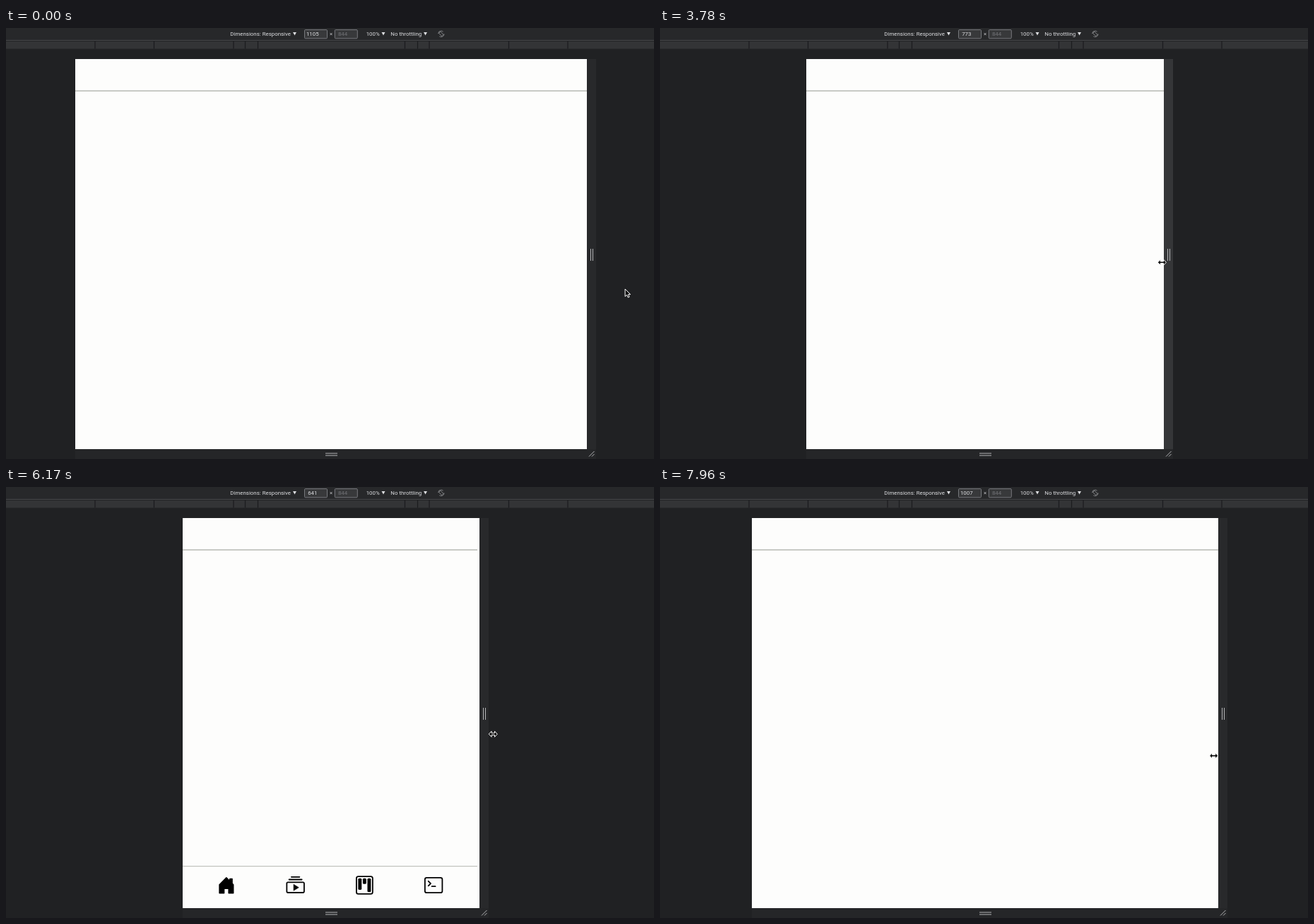
An HTML page that plays this animation: 917x611 px, repeating every 8 s.

```html
<!DOCTYPE html>
<html lang="en">
<head>
<meta charset="utf-8">
<title>Responsive layout</title>
<style>
  html, body { margin: 0; width: 100%; height: 100%; overflow: hidden; background: #202123; }
  svg { display: block; width: 100%; height: 100%; }
  text { font: 7.9px Roboto, sans-serif; fill: #dcdde0; }
  .mid { text-anchor: middle; }
  .field { fill: #38393b; stroke: #808286; stroke-width: .9; }
  .grip { stroke: #b4b5b7; stroke-width: 1; fill: none; }
  .line { fill: none; stroke: #000; stroke-width: 1.1; stroke-linecap: round; stroke-linejoin: round; }
  .pointer { fill: #0c0c0c; stroke: #fff; stroke-width: 1; stroke-linejoin: round; }
</style>
</head>
<body>
<svg viewBox="0 0 917 611" preserveAspectRatio="none">
  <rect width="917" height="611" fill="#202123"/>
  <rect width="917" height="17" fill="#27282a"/>
  <rect y="17" width="917" height="1" fill="#48494c"/>
  <rect y="19" width="917" height="10.5" fill="#333436"/>
  <path id="ticks" stroke="#1b1c1e" stroke-width="1.2"/>

  <text x="317.3" y="11.2">Dimensions: Responsive</text>
  <text x="509.7" y="11.2">100%</text>
  <text x="544.3" y="11.2">No throttling</text>
  <path d="M406 6h5l-2.5 4.6zM531.5 6h5l-2.5 4.6zM591 6h5l-2.5 4.6z" fill="#dcdde0"/>
  <rect class="field" x="422.5" y="2.5" width="32" height="12.3" rx="1.2"/>
  <rect class="field" x="465.3" y="2.5" width="32" height="12.3" rx="1.2"/>
  <text class="mid" id="size" x="433.8" y="11.2"></text>
  <text class="mid" x="460" y="11.2" style="fill:#c4c5c8">×</text>
  <text class="mid" x="476.6" y="11.2" style="fill:#737478">844</text>
  <g fill="none" stroke="#9a9b9e" stroke-width=".8">
    <circle cx="615.8" cy="8.4" r="4.2" stroke-dasharray="9 4.2"/>
    <rect x="614.2" y="5.4" width="3.2" height="6" rx=".5" transform="rotate(-45 615.8 8.4)"/>
  </g>

  <rect id="bottom" y="597" height="14" fill="#252628"/>
  <rect id="page" y="44" height="553" fill="#fdfdfc"/>
  <rect id="headLine" y="88.6" height="1" fill="#94978f"/>
  <g id="side">
    <rect id="bar" y="44" width="13" height="553"/>
    <path class="grip" d="M5.5 313v17M8.5 313v17M3 607.5l7.5-7.5M7 607.5l3.5-3.5"/>
  </g>
  <path class="grip" d="M452 603h17M452 606h17"/>

  <g id="nav">
    <rect id="navLine" y="537.2" height="1" fill="#b3b6b1"/>
    <g class="icon">
      <path d="M2 14.9V7.5L8 1.5l3 3v-2h2v4l1 1v7.4h-4v-4H6v4z" stroke="#000" stroke-width=".9" stroke-linejoin="round"/>
    </g>
    <g class="icon">
      <path class="line" d="M4.5 .9h7M2.5 3.1h11"/>
      <rect class="line" x=".5" y="5.5" width="15" height="8.9" rx="1"/>
      <path d="M6.4 7.2v5.6l4.5-2.8z" stroke="#000" stroke-width=".3" stroke-linejoin="round"/>
    </g>
    <g class="icon">
      <rect class="line" x="1" y=".5" width="14" height="15" rx="1.6"/>
      <rect x="2.5" y="2" width="3" height="10" rx="1"/>
      <rect x="6.5" y="2" width="3" height="5" rx="1"/>
      <rect x="10.5" y="2" width="3" height="12" rx="1"/>
    </g>
    <g class="icon">
      <rect class="line" x=".5" y="1.5" width="15" height="13" rx="1.5"/>
      <path class="line" d="M3.5 4.5l2 2-2 2M6.5 9h3"/>
    </g>
  </g>

  <path class="pointer" id="arrow" d="M0 0V10.6L2.5 8.3 4.2 12 6 11.2 4.4 7.7H7.6Z"/>
  <path class="pointer" id="resize" d="M-6 0L-2.2-4.1V-1.3H2.2V-4.1L6 0 2.2 4.1V1.3H-2.2V4.1Z"/>
</svg>
<script>
  const $ = id => document.getElementById(id);
  const LOOP = 8000, STEP = 1000 / 23, CENTER = 460.2, SCALE = 0.655, NAV_MAX = 768;
  const HAND_LEAD = 60, LAYOUT_LAG = 8;

  // Eased progress from 0 to 1 between two times
  function ease(t, from, to) {
    const u = Math.min(1, Math.max(0, (t - from) / (to - from)));
    return (1 - Math.cos(Math.PI * u)) / 2;
  }

  const approach = t => ease(t, 80, 1450);
  const shrink = t => ease(t, 2805, 4905);
  const grow = t => ease(t, 5298, 7497);
  const shrinkAgain = t => ease(t, 7497, 9008);

  const viewport = t => 1105 - 745 * shrink(t) + 820 * (grow(t) - shrinkAgain(t));
  const handX = t => CENTER + viewport(t + HAND_LEAD) * SCALE / 2 + 8 + 46 * (1 - approach(t));
  const handY = t => 370 - 48 * approach(t) + 23 * shrink(t) + 36 * ease(t, 5600, 7900);

  $('ticks').setAttribute('d', [104, 122, 138.5, 251, 334.5]
    .map(d => `M${460.5 - d} 19v10.5M${460.5 + d} 19v10.5`).join(''));
  const icons = document.querySelectorAll('.icon');

  function span(el, x, width) {
    el.setAttribute('x', x);
    el.setAttribute('width', width);
  }
  function move(el, x, y, extra = '') {
    el.setAttribute('transform', `translate(${x} ${y})${extra}`);
  }
  function show(el, on) {
    el.setAttribute('visibility', on ? 'visible' : 'hidden');
  }

  function draw(t) {
    const size = Math.round(viewport(t));
    const left = Math.round(CENTER - size * SCALE / 2);
    const right = Math.round(CENTER + size * SCALE / 2);
    const width = right - left, hasNav = size < NAV_MAX;
    // The narrow layout trails slightly while the page grows
    const content = hasNav ? Math.min(width, Math.round(viewport(t - LAYOUT_LAG) * SCALE)) : width;

    $('size').textContent = size;
    span($('page'), left, width);
    span($('bottom'), left, width + 13);
    span($('headLine'), left, content);
    move($('side'), right, 0);

    show($('nav'), hasNav);
    span($('navLine'), left, content);
    const gap = content / 4 - 6.5;
    icons.forEach((icon, i) =>
      move(icon, left + content / 2 + (i - 1.5) * gap - 13.1, 551.4, ' scale(1.6375)'));

    const x = handX(t), y = handY(t);
    const pointing = approach(t) < 0.9;
    show($('arrow'), pointing);
    show($('resize'), !pointing);
    move($('arrow'), x, y);
    move($('resize'), x, y);
    const hover = x > right - 4 && x < right + 13;
    $('bar').setAttribute('fill', hover ? '#353638' : '#28292b');
  }

  const start = performance.now();
  function tick() {
    const t = (performance.now() - start) % LOOP;
    // Hold each pose for one step; times are rounded to 10 ms
    draw(Math.floor((t + 5) / STEP) * STEP);
    requestAnimationFrame(tick);
  }
  tick();
</script>
</body>
</html>
```
